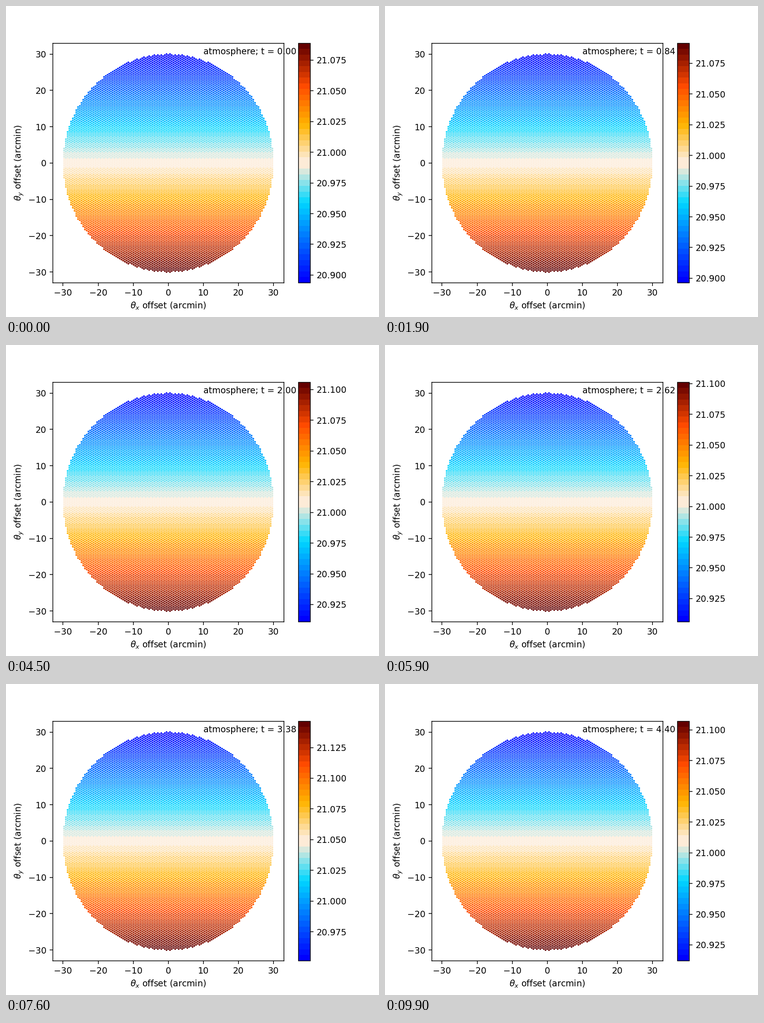
Recreate the animation shown at these times as a matplotlib script. Size 820 px wide and 683 px high, loop 10 s.

```python
import numpy as np
import matplotlib.pyplot as plt
from matplotlib.animation import FuncAnimation
from matplotlib.colors import LinearSegmentedColormap
from matplotlib.ticker import MultipleLocator

DPI = 136.6
FRAMES = 100
RADIUS = 30.0      # field radius, arcmin
PITCH = 0.5714     # detector spacing, arcmin
SPAN = 0.195       # signal range across the field
DT = 2 / 45        # time step per frame

CMAP = LinearSegmentedColormap.from_list("sky", [
    (0.0, "#0000ff"), (0.332, "#00d7ff"), (0.486, "#fdebd7"),
    (0.514, "#fdebd7"), (0.664, "#ffb400"), (0.828, "#ff4b00"),
    (1.0, "#640000")], N=42)

# Drift of the lowest signal level: knots in frames and in 1/2697 units
KNOTS = np.array([0, 9, 11, 19, 29, 33, 36, 45, 55, 59, 66, 76, 81, 88, 99.0])
LEVELS = np.array([-17, -51, -49, -10, 46.4, 55.4, 53, 29.5, 15.6, 16.4,
                   57.4, 138.5, 160, 136, 32.5])
SLOPES = np.gradient(LEVELS, KNOTS)


def base_level(i):
    """Cubic Hermite interpolation of the drift."""
    k = min(np.searchsorted(KNOTS, i, side="right") - 1, len(KNOTS) - 2)
    h = KNOTS[k + 1] - KNOTS[k]
    u = (i - KNOTS[k]) / h
    level = ((1 + 2 * u) * (1 - u) ** 2 * LEVELS[k]
             + u * (1 - u) ** 2 * h * SLOPES[k]
             + u * u * (3 - 2 * u) * LEVELS[k + 1]
             + u * u * (u - 1) * h * SLOPES[k + 1])
    return 20.9 + level / 2697


def hex_disc():
    """Hexagonal packing with vertical columns, cut to a disc."""
    col, row = np.meshgrid(np.arange(-60, 61), np.arange(-54, 55))
    x = col * PITCH * np.sqrt(3) / 2
    y = (row + (col % 2) / 2) * PITCH
    inside = np.hypot(x, y) <= RADIUS + 0.01
    return x[inside], y[inside]


fig, ax = plt.subplots(figsize=(820.01 / DPI, 683.01 / DPI), dpi=DPI)
x, y = hex_disc()
depth = (y.max() - y) / np.ptp(y)

dots = ax.scatter(x, y, c=base_level(0) + SPAN * depth, s=4.2, linewidths=0,
                  cmap=CMAP)
ax.set(xlim=(-32.97, 32.97), ylim=(-32.97, 32.97),
       xlabel=r"$\theta_x$ offset (arcmin)",
       ylabel=r"$\theta_y$ offset (arcmin)")
fig.colorbar(dots, ax=ax, ticks=MultipleLocator(0.025), format="%.3f")
label = ax.text(10, 30, "")


def update(i):
    low = base_level(i)
    dots.set_array(low + SPAN * depth)
    dots.set_clim(low, low + SPAN)
    label.set_text(f"atmosphere; t = {i * DT:.2f}")
    return dots, label


anim = FuncAnimation(fig, update, frames=FRAMES, interval=100,
                     repeat=True, repeat_delay=0, blit=False)
plt.show()
```
